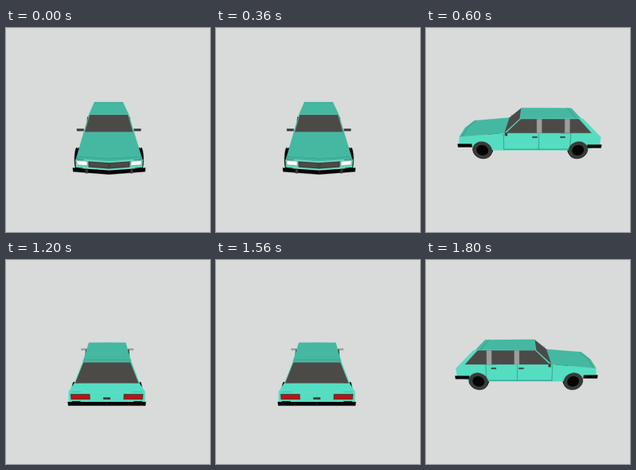
Animation, 256 px wide and 256 px high, one loop 2400 ms. Source, as an HTML page:

```html
<!DOCTYPE html>
<html lang="en">
<head>
<meta charset="utf-8">
<title>Turning car</title>
<style>
html, body { margin: 0; width: 100%; height: 100%; overflow: hidden; background: #d9dbda; }
svg { display: block; width: 100vw; height: 100vh; }
</style>
</head>
<body>
<svg id="stage" viewBox="0 0 256 256"></svg>
<script>
const HOLD = 600, TURNS = 4;
const TOP = '#45b8a1', BODY = '#55ddc2', EDGE = '#369c88', GLASS = '#4c4a47';
const DARK = '#3a3a38', BLACK = '#050505', GREY = '#9b9f9e', RED = '#c01212';

// Camera: a perspective view from slightly above.
const FOCAL = 214, DIST = 223, PITCH = 0.379, SHIFT = 1;
const SIN = Math.sin(PITCH), COS = Math.cos(PITCH);
let yaw = 0, out = [];

function project([u, h, z]) {
  const c = Math.cos(yaw), s = Math.sin(yaw), w = u + SHIFT;
  const x = w * c - z * s, near = w * s + z * c;
  const scale = FOCAL / (DIST - near * COS - h * SIN);
  return [128 + x * scale, 128 - (h * COS - near * SIN) * scale];
}

const lerp = (a, b, t) => a + (b - a) * t;
const flip = points => points.map(([u, h, z]) => [-u, h, z]).reverse();

// Draws a polygon if it turns its outer side to the camera.
function face(fill, points, cull = true) {
  const p = points.map(project);
  const area = p.reduce((sum, [x, y], i) => {
    const [nx, ny] = p[(i + 1) % p.length];
    return sum + x * ny - nx * y;
  }, 0);
  if (cull && area >= 0) return;
  const list = p.map(([x, y]) => x.toFixed(2) + ',' + y.toFixed(2)).join(' ');
  out.push(`<polygon fill="${fill}" stroke="${fill}" stroke-width=".3" points="${list}"/>`);
}

function pair(fill, points, cull) {
  face(fill, points, cull);
  face(fill, flip(points), cull);
}

// Completes the left half of a shape with its mirror image.
const whole = half => [...half, ...flip(half)];

function shrink(points, k) {
  const mid = [0, 1, 2].map(i => points.reduce((sum, p) => sum + p[i], 0) / points.length);
  return points.map(p => p.map((v, i) => lerp(mid[i], v, k)));
}

const patch = (at, a, b, low, high) => [at(a, low), at(b, low), at(b, high), at(a, high)];

// Key points of the left half: [sideways, height, forward].
const ROOF = 23.7, BELT = 8, SILL = -12;
const roofFront = [24, ROOF, 9], roofRear = [22.5, ROOF, -59.5];
const beltFront = [28.7, BELT, 27], beltRear = [29.3, BELT, -72];
const hoodTip = [29, 3.6, 78], nose = [0, 3.5, 81.5];
const shoulder = [32.7, 5, -81], tail = [33.4, -4.5, -81];

const flank = (z, h) => [
  h > BELT ? lerp(29, 23.3, (h - BELT) / (ROOF - BELT)) : lerp(32.2, 29, (h - SILL) / (BELT - SILL)), h, z
];
const grille = (u, h) => [u, h, 82 - u * 0.12];
const rear = (u, h) => [u, h, -81.2];

function disc(u, z, r) {
  return Array.from({ length: 20 }, (_, i) => {
    const a = i * Math.PI / 10;
    return [u, -11 + r * Math.sin(a), z - r * Math.cos(a)];
  });
}

function bumper(dir, width, end, bulge) {
  const wrap = (z, h) => [width, h, z * dir];
  const bow = (u, h) => [u, h, dir * (end + bulge * (1 - u / width))];
  const ends = dir > 0 ? [0, width] : [width, 0];
  const sides = dir > 0 ? [end, end - 16] : [end - 16, end];
  pair(BLACK, patch(wrap, ...sides, -8, -4));
  pair(BLACK, patch(bow, ...ends, -8, -4));
}

function mirrors() {
  const plate = (u, h) => [u, h, 24];
  pair(DARK, patch(plate, 29, 37, 8.3, 11));
  pair(GREY, patch(plate, 37, 29, 8.3, 11));
}

function sides() {
  pair(BODY, [hoodTip, [30.5, -5, 79], [32, SILL, 40], [32, SILL, -66], tail, shoulder, beltRear, beltFront]);
  pair(BODY, [beltFront, beltRear, roofRear, roofFront]);
  pair(GLASS, [flank(24.8, 8.2), flank(-72, 8.2), flank(-59.5, 23), flank(8, 23)]);
  for (const z of [-10, -41.5]) {
    pair(GREY, patch(flank, z, z - 5.5, 8.2, 23));
    pair(DARK, patch(flank, z + 5, z - 0.5, 2.8, 4.2));
  }
  for (const z of [28, -12, -48]) pair(EDGE, patch(flank, z, z - 0.5, -11, 7));
  pair(EDGE, patch(flank, 28, -46, -11, -10.4));
}

function front() {
  const crease = [[0, 4, 78.5], [28.6, 4, 75], [28.6, 4, 74.4], [0, 4, 77.9]];
  face(TOP, whole([nose, hoodTip, beltFront]));
  face(EDGE, whole(crease));
  pair(BODY, patch(grille, 0, 29.5, -4.5, 3.6));
  pair(DARK, patch(grille, 0, 18, -3.4, 2.4));
  pair(GLASS, patch(grille, 1, 17, -2.6, 1.7));
  pair(GREY, patch(grille, 18.7, 28.8, -2.3, 2.8));
  pair('#fff', patch(grille, 19.5, 28, -1.5, 2.1));
}

function back() {
  face(BODY, whole([beltRear, shoulder]));
  face(BODY, whole([shoulder, tail]));
  pair(DARK, patch(rear, 31.2, 14.6, -2.8, 2.6));
  pair(RED, patch(rear, 30.5, 15.3, -2.1, 1.9));
  pair(DARK, patch(rear, 3, 0, -2.7, -0.8));
}

function cabin() {
  const shield = whole([beltFront, roofFront]), hatch = whole([roofRear, beltRear]);
  face(TOP, shield);
  face(GLASS, shrink(shield, 0.95));
  face(BODY, hatch);
  face(GLASS, shrink(hatch, 0.97));
  face(TOP, whole([roofFront, roofRear]));
  face(EDGE, whole([[22.5, ROOF, -54], [22.5, ROOF, -54.6]]));
}

function wheels(z) {
  pair(DARK, disc(34, z, 11));
  pair(BLACK, disc(34, z, 6.6));
}

function car() {
  const axles = [52, -57];
  mirrors();
  for (const z of axles) for (let u = 28; u <= 34; u += 2) pair(BLACK, disc(u, z, 11), false);
  sides();
  front();
  back();
  cabin();
  bumper(1, 32, 80, 4);
  bumper(-1, 33.7, 83, 0);
  pair(DARK, patch((u, h) => [u, h, 83], 18.5, 20.5, -7.5, -3.5));
  pair(DARK, patch((z, h) => [36, h, z], 25, 22.5, 8, 11.5));
  axles.forEach(wheels);
}

const stage = document.getElementById('stage');
let shown = -1;

function draw(time) {
  const turn = Math.floor(time / HOLD) % TURNS;
  if (turn === shown) return;
  shown = turn;
  yaw = turn * 2 * Math.PI / TURNS;
  out = [];
  car();
  stage.innerHTML = out.join('');
}

let start;
function tick(now) {
  start ??= now;
  draw(Math.max(0, now - start));
  requestAnimationFrame(tick);
}
draw(0);
requestAnimationFrame(tick);
</script>
</body>
</html>
```
